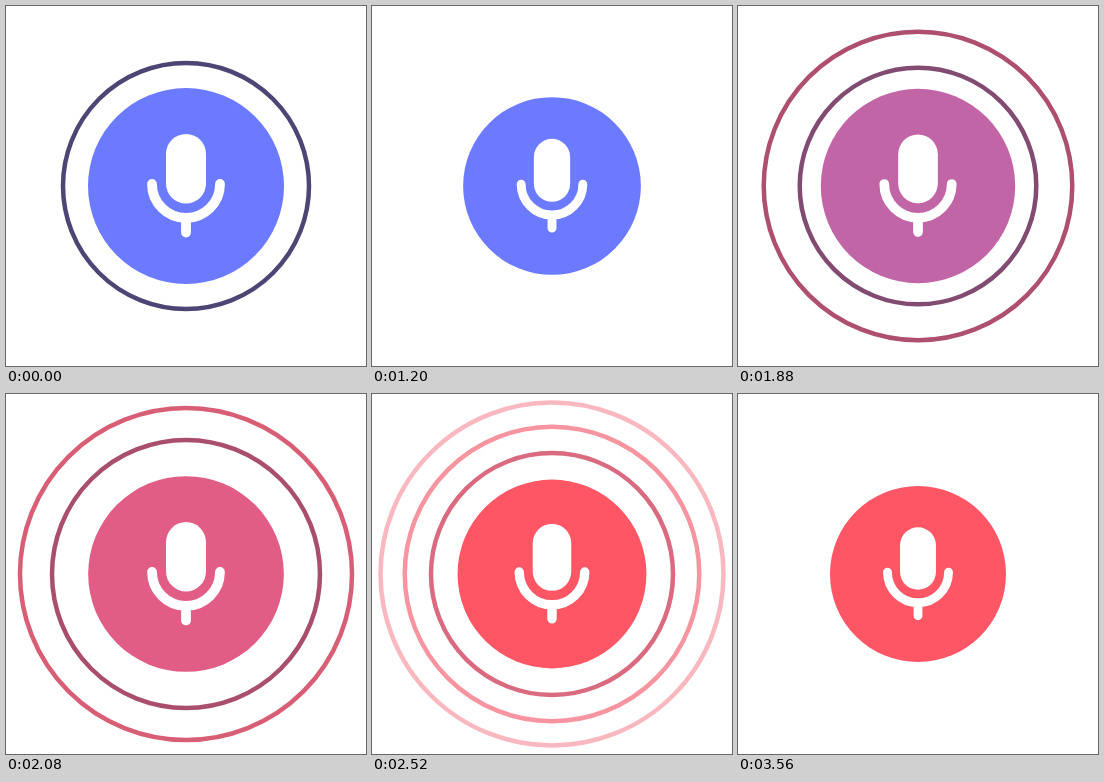
An HTML page with a canvas for the animation above (3600 ms loop, 360x360 px).

```html
<!DOCTYPE html>
<html lang="en">
<head>
<meta charset="utf-8">
<title>Voice pulse</title>
<style>
  html, body { margin: 0; width: 100%; height: 100%; overflow: hidden; background: #fff; }
  canvas { display: block; width: 360px; height: 360px; }
</style>
</head>
<body>
<canvas id="stage" width="360" height="360"></canvas>
<script>
const ctx = document.getElementById('stage').getContext('2d');
const LOOP = 3600, STEP = 40, CENTER = 180;
const BLUE = [108, 122, 255], RED = [255, 86, 102], NAVY = [77, 70, 117];
const BIG = 98, SMALL = 88;

// Each wave eases out to its limit while its colour warms, then fades.
const WAVES = [
  { limit: 171.5, settle: 2510, rate: 0.0041, warm: 1395, fade: 2020 },
  { limit: 148, settle: 2783, rate: 0.00343, warm: 1610, fade: 2200 },
  { limit: 123, settle: 2827, rate: 0.0041, warm: 1845, fade: 2400 }
];

const clamp = x => Math.min(1, Math.max(0, x));
const progress = (t, start, length) => clamp((t - start) / length);
const easeOut = x => 1 - Math.pow(1 - x, 2.6);
const lerp = (a, b, k) => a + (b - a) * k;
const mix = (a, b, k) => `rgb(${a.map((v, i) => Math.round(lerp(v, b[i], k))).join(',')})`;

function discRadius(t) {
  if (t < 1160) return lerp(BIG, SMALL, easeOut(t / 1160));
  if (t < 2320) return lerp(SMALL, BIG, easeOut((t - 1160) / 1160));
  return lerp(BIG, SMALL, easeOut((t - 2320) / 1280));
}

function drawRing(radius, color, alpha) {
  if (alpha <= 0 || radius <= 0) return;
  ctx.globalAlpha = alpha;
  ctx.strokeStyle = color;
  ctx.lineWidth = 4.5;
  ctx.beginPath();
  ctx.arc(CENTER, CENTER, radius, 0, Math.PI * 2);
  ctx.stroke();
  ctx.globalAlpha = 1;
}

function drawWave(t, wave) {
  const left = Math.max(0, wave.settle - t) * wave.rate;
  const warmth = Math.min(0.92, progress(t, wave.warm, 900));
  drawRing(wave.limit - left ** 3, mix(NAVY, RED, warmth), 1 - progress(t, wave.fade, 860));
}

function drawButton(t) {
  const scale = discRadius(t) / BIG;
  ctx.save();
  ctx.translate(CENTER, CENTER);
  ctx.scale(scale, scale);
  ctx.fillStyle = mix(BLUE, RED, progress(t, 1360, 900));
  ctx.beginPath();
  ctx.arc(0, 0, BIG, 0, Math.PI * 2);
  ctx.fill();

  ctx.fillStyle = ctx.strokeStyle = '#fff';
  ctx.beginPath();
  ctx.roundRect(-20, -52, 40, 69.5, 20);
  ctx.fill();
  ctx.lineWidth = 9.8;
  ctx.lineCap = 'round';
  ctx.beginPath();
  ctx.arc(0, -2, 34, Math.PI, 0, true);
  ctx.moveTo(0, 33);
  ctx.lineTo(0, 46.5);
  ctx.stroke();
  ctx.restore();
}

function draw(now) {
  const t = Math.floor((now % LOOP) / STEP) * STEP;
  ctx.fillStyle = '#fff';
  ctx.fillRect(0, 0, 360, 360);
  drawRing(123, mix(NAVY, NAVY, 0), 1 - progress(t, 0, 400));
  WAVES.forEach(wave => drawWave(t, wave));
  drawButton(t);
  requestAnimationFrame(draw);
}

draw(0);
</script>
</body>
</html>
```
